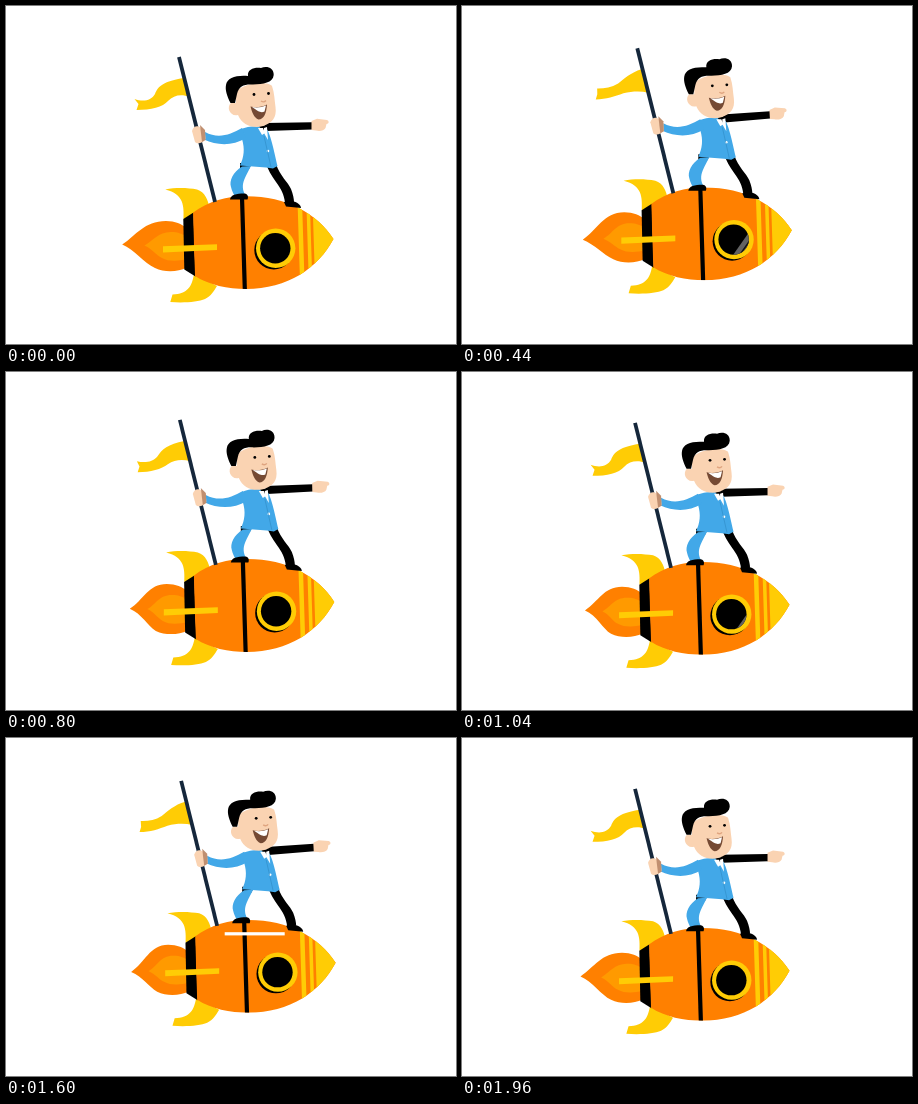
These frames come from a looping animation (450x338 px, 2 s). An HTML page:

```html
<!DOCTYPE html>
<html lang="en">
<head>
<meta charset="utf-8">
<title>Rocket ride</title>
<style>
  html, body { margin: 0; width: 100%; height: 100%; overflow: hidden; background: #fff; }
  svg { display: block; width: 100%; height: 100%; }
  .orange { fill: #ff8000; }
  .yellow { fill: #ffcc05; }
  .blue { fill: #42a8e8; }
  .skin { fill: #fad3b2; }
  .white { fill: #fff; }
</style>
</head>
<body>
<svg viewBox="0 0 450 338">
  <defs>
    <clipPath id="hull"><path d="M186.500 207C203 194.500 221 190.200 240 190.200C280 190 311 207 327.500 233C312 262 282 283 240 283C222 283 203 279 189 270Z"/></clipPath>
    <clipPath id="pane"><circle cx="269.300" cy="242.300" r="15.200"/></clipPath>
  </defs>

  <g id="ride">
    <!-- rocket -->
    <path id="flame" class="orange"/>
    <path id="core" fill="#ff9a00"/>
    <path class="yellow" d="M159.300 183.500C170 181.300 182 181.800 191 183.500C199 186 202 194 203.500 202L187 210L177.500 213C178 200 178 188 159.300 183.500Z"/>
    <path class="yellow" d="M188 268C186 280 182 288 166.500 288.500L164.300 296C178 297 192 296 199 293C205 290 208 285 211 280Z"/>
    <path d="M177.300 213L187.500 206.500L189.500 270.500L178.300 263.500Z"/>
    <g clip-path="url(#hull)">
      <path class="orange" d="M186.500 180H340V290H189Z"/>
      <path d="M235.900 188L238.900 286" stroke="#000" stroke-width="4.200"/>
      <path class="yellow" d="M291.500 195H296L298.500 275H294Z"/>
      <path class="yellow" d="M300.300 195H303.800L306.300 275H302.800Z"/>
      <path class="yellow" d="M306.500 195H340V275H309Z"/>
    </g>
    <circle cx="267.800" cy="244" r="19.500"/>
    <circle class="yellow" cx="269.700" cy="242.300" r="19.700"/>
    <circle cx="269.300" cy="242.300" r="15.200"/>
    <g clip-path="url(#pane)">
      <g id="glare">
        <path d="M0 -30H40V30H0Z" fill="#626262"/>
        <path d="M5.500 -30V30" stroke="#111" stroke-width="1.500"/>
      </g>
    </g>
    <path class="yellow" d="M157 240.300L211 238.300V244L157 246.500Z"/>

    <!-- flag -->
    <path id="flag" class="yellow"/>
    <path d="M173 51L209 196" stroke="#15273b" stroke-width="3.800"/>

    <!-- legs -->
    <path d="M260 157L270 158C274 170 282 176 285 183C287 188 288 193 288 196L279 197C278 188 275 183 270 176C265 169 262 164 260 157Z"/>
    <path d="M278 196L286 195C291 196 295 199 295 202L280 200.500Z"/>
    <path d="M234 157H246L243 163H234Z"/>
    <path class="blue" d="M236 160.500C227 166 223 175 225 181C226 185 227 187 228.500 189.500L239 188.500C236.500 184 236 179 238.500 173C240.500 168 243 164 245 160Z"/>
    <path d="M224 193.500C224.500 189 230 187.500 238.500 187.500C242 188 242.500 191 241.500 193.500Z"/>

    <!-- pointing arm -->
    <g id="arm">
      <path d="M258 117L306 116.200V123.500L260 125Z"/>
      <path class="skin" d="M305.500 115L311 112.800L321 114C323.500 115 323 118 320.500 118L319.500 122C318 125 313 125.500 310 124.500L305.500 124Z"/>
    </g>

    <!-- torso -->
    <path class="blue" d="M235 123C242 120 253 119 260 122C264 126 268 144 271.500 160L267 162.500L260 161.500L234 159.500C238 151 239 143 236 133Z"/>
    <path class="blue" d="M199 126C212 133 224 129 236 122L240 132C226 140.500 211 139.500 198 133.500Z"/>
    <path d="M253 120L264 119L263 124L260 123L257 126Z"/>
    <path class="white" d="M252 122L257 122L259 127L256 129Z"/>
    <path class="white" d="M258 122L261 121L262 134L258 127Z"/>
    <circle class="white" cx="262" cy="145" r="1.300"/>
    <path d="M258 130L265 161" stroke="#318fc9" stroke-width=".7"/>
    <path class="skin" d="M186 125C187 120 192 119 195 122L199 126L199.500 133C196 138 191 138 189 136Z"/>
    <path d="M194 119L199 124L199.500 134L196 136Z" fill="#c08f70"/>

    <!-- head -->
    <path class="skin" d="M230 86C238 76 262 75 266 80C268.500 87 268.500 94 269.500 101C271 112 266 117 257 120C247 123 236 119 232 109C224 111 220 101 225 97L230 97Z"/>
    <path d="M224.500 97C221 90 219 84 220 79C221 72 230 69 242 70C241 63 249 61 255 62C260 59.500 268 61 267.700 69C267 77 257 78 247 78.500C238 78 233 80 231 88L229 97Z"/>
    <circle cx="248" cy="88.500" r="1.400"/>
    <circle cx="262.500" cy="87.500" r="1.400"/>
    <path d="M255 95Q258 97 260 94.500" fill="none" stroke="#dfa47f" stroke-width="1.300"/>
    <path d="M244.500 100.500C250 102 256 101 261 98.500C260.500 107 258 113.500 252.500 113.500C248 112 246 106 244.500 100.500Z" fill="#754a34"/>
    <path class="white" d="M246 101C251 102 256 101.300 260 99.500L258.500 105.500C255 107 253 106 246 101Z"/>
  </g>
  <g id="streaks" class="white"></g>
</svg>
<script>
const LOOP = 2000, STEP = 40;
const get = id => document.getElementById(id);
const wave = (t, period) => (1 - Math.cos(2 * Math.PI * t / period)) / 2;

// Two poses of the flag outline, blended by the bob.
const waved = [178,72, 158,75, 152,80, 149,88, 145,95, 137,96, 128.5,93, 132.5,98,
  130.5,104, 145,104, 157,101, 162,95, 168,89, 175,88, 184,91];
const calm = [177,72, 167,75, 160,82, 154,86, 147,90, 140,91, 133,91, 133,97,
  131.5,102, 142,102, 150,99, 159,96, 168,94, 177,94, 184,95.5];
const flagParts = ['M', 'C', '', '', 'C', '', '', 'L', 'L', 'C', '', '', 'C', '', ''];

function flagPath(k) {
  const at = i => (waved[i] + (calm[i] - waved[i]) * k).toFixed(2);
  return flagParts.map((c, i) => `${c}${at(2 * i)} ${at(2 * i + 1)}`).join(' ') + 'Z';
}

// White speed lines: left end x at time t, moving left.
const streaks = [
  { t: 600, x: 183.5, y: 194.2 },
  { t: 1280, x: 146, y: 187.7 },
  { t: 1600, x: 218.7, y: 194.2 }
].map(s => {
  const el = document.createElementNS('http://www.w3.org/2000/svg', 'rect');
  el.setAttribute('width', 60);
  el.setAttribute('height', 3.2);
  el.setAttribute('y', s.y);
  get('streaks').append(el);
  return { ...s, el };
});

function draw(t) {
  const k = wave(t, 1000);
  get('ride').setAttribute('transform', `translate(${2.4 * k} ${-9 * k})`);
  get('arm').setAttribute('transform', `rotate(${-3.2 * k} 262 121)`);
  get('flag').setAttribute('d', flagPath(k));

  // The flame tip flickers and trails behind the bob.
  const pull = 9 * wave(t, 240);
  const tip = 116.2 + pull, tipY = 238.5 + 4 * k;
  get('flame').setAttribute('d',
    `M${tip} ${tipY}C${tip + 14} ${tipY - 9} ${138 + pull * .5} 215 160 215C169 215 176 218 180 222V262` +
    `C173 265.500 159 267 149 262C${138 + pull * .4} 257 ${tip + 12} ${tipY + 5} ${tip} ${tipY}Z`);
  const inner = 138.5 + pull * .3, innerY = 239.5 + 2 * k;
  get('core').setAttribute('d',
    `M${inner} ${innerY}C${inner + 9} ${innerY - 5} 152 226 165 226C172 226 177 228 180 231V253` +
    `C173 255 163 256 156 252C150 249 ${inner + 7} ${innerY + 3} ${inner} ${innerY}Z`);

  const phase = t % 1000;
  const edge = phase < 560 ? 15.2 - 11 * Math.sin(Math.PI * phase / 560) : 40;
  get('glare').setAttribute('transform', `translate(269.3 242.3) rotate(35) translate(${edge} 0)`);

  for (const s of streaks) s.el.setAttribute('x', s.x - (t - s.t));
}

const start = performance.now();
function tick() {
  const t = (performance.now() - start) % LOOP;
  draw(Math.floor(t / STEP) * STEP);
  requestAnimationFrame(tick);
}
tick();
</script>
</body>
</html>
```
